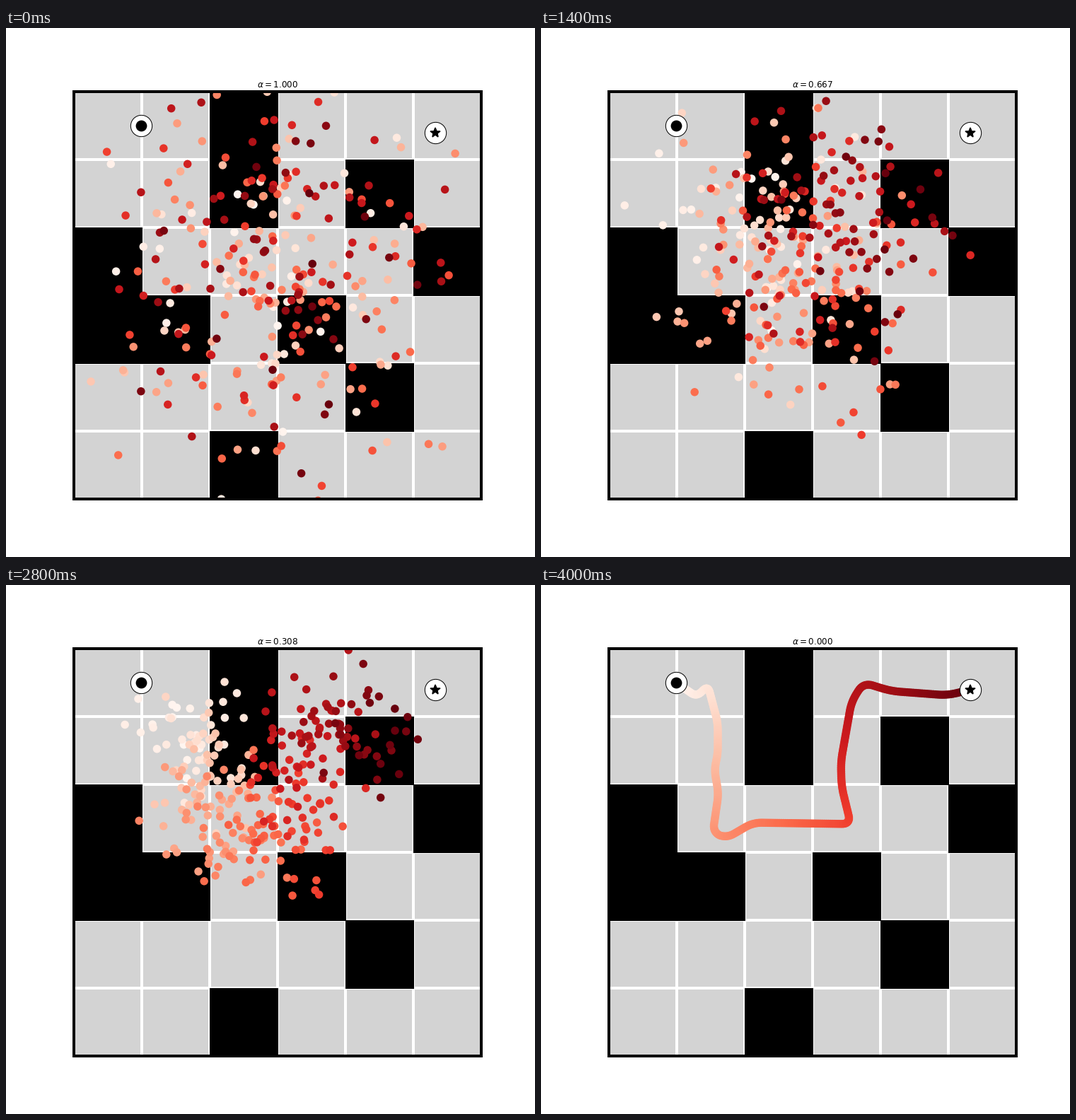
These frames come from a looping animation (748x748 px, 5100 ms). A matplotlib script:

```python
import numpy as np
import matplotlib.pyplot as plt
from matplotlib.animation import FuncAnimation
from matplotlib.patches import Rectangle

SIZE, DPI = 748, 88
PX = 72 / DPI                      # one pixel in points
LEFT, TOP, CELL, N_CELLS = 96, 90, 96, 6
SIDE = CELL * N_CELLS
STEPS = 39
N_POINTS = 300

MAZE = ["..#...",
        "..#.#.",
        "#....#",
        "##.#..",
        "....#.",
        "..#..."]

# corners of the solved route, from start to goal
CORNERS = [(191, 138), (220, 158), (236, 142), (250, 195), (250, 240),
           (245, 260), (251, 295), (243, 350), (262, 358), (300, 336),
           (438, 338), (425, 285), (424, 250), (439, 165), (456, 138),
           (495, 150), (575, 156), (607, 148)]


def smooth(values, width=9):
    padded = np.pad(values, width // 2, mode="edge")
    return np.convolve(padded, np.ones(width) / width, mode="valid")


def make_route(progress):
    """Follow the corners by arc length, speeding up slightly, and round them."""
    x, y = np.array(CORNERS, float).T
    length = np.append(0, np.cumsum(np.hypot(np.diff(x), np.diff(y))))
    at = progress ** 1.13 * length[-1]
    return np.column_stack([smooth(np.interp(at, length, v)) for v in (x, y)])


def make_noise():
    rng = np.random.default_rng(7)
    centre = LEFT + SIDE / 2, TOP + SIDE / 2
    return rng.normal(centre, (124, 144), (N_POINTS, 2))


def badge(x, y, marker, size):
    ax.plot(x, y, "o", ms=30.3 * PX, mfc="white", mec="black", mew=PX, zorder=3)
    ax.plot(x, y, marker, ms=size * PX, color="black", mew=1.5 * PX, zorder=4)


fig = plt.figure(figsize=(SIZE / DPI, SIZE / DPI), dpi=DPI, facecolor="white")
ax = fig.add_axes([LEFT / SIZE, 1 - (TOP + SIDE) / SIZE, SIDE / SIZE, SIDE / SIZE],
                  facecolor="lightgray")
ax.set(xlim=(LEFT, LEFT + SIDE), ylim=(TOP + SIDE, TOP), xticks=[], yticks=[])
for spine in ax.spines.values():
    spine.set_linewidth(4 * PX)

for i in range(1, N_CELLS):
    ax.axvline(LEFT + i * CELL, color="white", lw=4 * PX, zorder=1)
    ax.axhline(TOP + i * CELL, color="white", lw=4 * PX, zorder=1)
for row, line in enumerate(MAZE):
    for col, cell in enumerate(line):
        if cell == "#":
            ax.add_patch(Rectangle((LEFT + col * CELL, TOP + row * CELL),
                                   CELL + 1, CELL + 1, fc="black", lw=0, zorder=1.5))

progress = np.linspace(0, 1, N_POINTS)
route, noise = make_route(progress), make_noise()
dots = ax.scatter(*noise.T, c=plt.cm.Reds(progress), s=(11.5 * PX) ** 2,
                  linewidths=0, zorder=2)
badge(191.3, 137.8, "o", 14.3)
badge(607.3, 147.6, "*", 14.3)
title = ax.set_title("", fontsize=12 * PX, pad=6 * PX)


def update(frame):
    # one extra hold on the first state, a long one on the last
    alpha = 1 - np.clip(frame - 1, 0, STEPS) / STEPS
    dots.set_offsets(alpha * noise + (1 - alpha) * route)
    title.set_text(rf"$\alpha = {alpha:.3f}$")
    return dots, title


anim = FuncAnimation(fig, update, frames=51, interval=100,
                     repeat=True, repeat_delay=0, blit=False)
plt.show()
```
